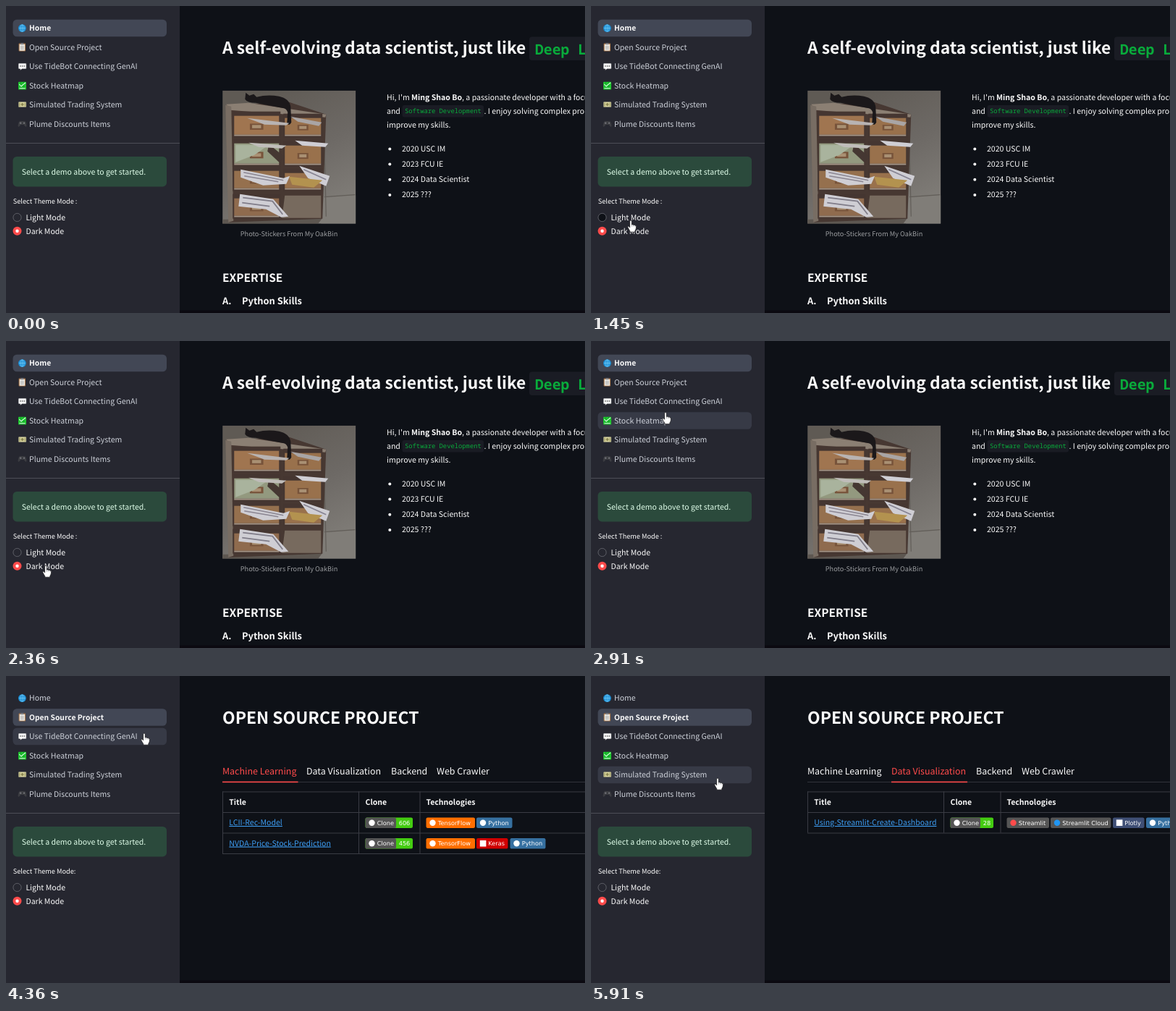
An HTML page that plays this animation: 800x424 px, repeating every 6 s.

```html
<!DOCTYPE html>
<html lang="en">
<head>
<meta charset="utf-8">
<title>Portfolio demo</title>
<style>
  html, body { margin: 0; width: 100%; height: 100%; overflow: hidden; background: #0e1117; }
  svg { display: block; }
  text { white-space: pre; text-rendering: geometricPrecision;
    font-family: 'Noto Sans CJK SC', 'Noto Sans CJK JP', 'Noto Sans CJK TC', 'Noto Sans', sans-serif; }
  .mono { font-family: 'Noto Sans Mono', 'DejaVu Sans Mono', monospace; }
  .badge { font-family: 'DejaVu Sans', sans-serif; }
</style>
</head>
<body>
<svg id="stage" width="800" height="424" viewBox="0 0 800 424"></svg>
<script>
const LOOP = 6000, FPS = 11;
const RED = '#ff4b4b', GREEN = '#09ab3b';

const THEMES = {
  dark: {
    main: '#0e1117', side: '#262730', text: '#fafafa', nav: '#ccd0d8', active: '#424755', hover: '#373a46',
    line: '#4d4e56', alert: '#2b4a3c', alertText: '#dffde9', caption: '#9a9c9f', chip: '#1a1c24',
    radio: '#262730', radioHover: '#0e1117', ring: '#6b6c74', ink: '#30323a', pad: '#3c3d42', board: '#a8794e'
  },
  light: {
    main: '#ffffff', side: '#f0f2f6', text: '#31333f', nav: '#5b5f6a', active: '#dadfe9', hover: '#e3e7ee',
    line: '#d2d4da', alert: '#dbede6', alertText: '#21703f', caption: '#85878d', chip: '#f8f9fb',
    radio: '#ffffff', radioHover: '#ffffff', ring: '#b4b6bd', ink: '#22242a', pad: '#202226', board: '#22242a'
  }
};

const NAV = ['Home', 'Open Source Project', 'Use TideBot Connecting GenAI',
  'Stock Heatmap', 'Simulated Trading System', 'Plume Discounts Items'];
const TABS = [['Machine Learning', 299, 403.5], ['Data Visualization', 415, 520], ['Backend', 532, 583], ['Web Crawler', 595, 670]];

// Pointer path: step, x, y of the tip
const PATH = [
  [4, 560, 397], [5, 500, 335], [6, 410, 280], [7, 300, 268], [8, 190, 276], [9, 110, 288], [10, 66, 298],
  [11, 62, 312], [13, 60, 318], [16, 55, 296], [18, 55, 296], [21, 55, 310], [26, 55, 310], [28, 60, 280],
  [30, 84, 185], [32, 103, 98.5], [33, 107, 78], [34, 108, 67], [47, 108, 67], [48, 191, 79], [50, 345, 108],
  [52, 442, 128], [54, 470, 132], [60, 470, 132], [61, 425, 135], [62, 355, 141], [63, 278, 146],
  [64, 203, 150], [65, 175, 141]
];

const text = (x, y, s, fill, size = 10.55, weight = 400, attrs = '') =>
  `<text x="${x}" y="${y}" fill="${fill}" font-size="${size}" font-weight="${weight}" ${attrs}>${s}</text>`;
const rect = (x, y, w, h, fill, r = 0) =>
  `<rect x="${x}" y="${y}" width="${w}" height="${h}" rx="${r}" fill="${fill}"/>`;
const circle = (x, y, r, fill, attrs = '') => `<circle cx="${x}" cy="${y}" r="${r}" fill="${fill}" ${attrs}/>`;
const path = (d, fill, stroke = 'none', width = 1) =>
  `<path d="${d}" fill="${fill}" stroke="${stroke}" stroke-width="${width}"/>`;

function pointer(step) {
  const i = PATH.findIndex(p => p[0] >= step);
  if (step < PATH[0][0] || i < 0) return null;
  const b = PATH[i], a = PATH[Math.max(0, i - 1)];
  const u = b[0] === a[0] ? 1 : (step - a[0]) / (b[0] - a[0]);
  return { x: a[1] + (b[1] - a[1]) * u, y: a[2] + (b[2] - a[2]) * u };
}

const within = (p, x0, y0, x1, y1) => !!p && p.x >= x0 && p.x <= x1 && p.y >= y0 && p.y <= y1;
const navTop = i => 18.7 + 26.5 * i;
const overNav = (p, i) => within(p, 9.5, navTop(i), 222, navTop(i) + 23.6);
const overTab = (p, i) => within(p, TABS[i][1], 118, TABS[i][2], 147);

function icons(c) {
  return circle(22.4, 30.6, 5.4, '#1c8fd6') +
    path('M18 30.6h8.8M22.4 26v9.2', 'none', '#7fd0f7', 0.7) +
    `<ellipse cx="22.4" cy="30.6" rx="2.5" ry="4.8" fill="none" stroke="#7fd0f7" stroke-width=".7"/>` +
    rect(17.6, 51.6, 9.4, 11, c.board, 1) +
    rect(18.7, 53, 7.2, 8.6, '#f1efe9') + rect(20.2, 50.9, 4.2, 2.4, '#77797f', 0.6) +
    path('M19.8 55.6h5M19.8 57.5h5M19.8 59.4h5', 'none', '#85878c', 0.7) +
    path('M18 79h9.2q1 0 1 1v6q0 1-1 1h-5l-2.6 2v-2H18q-1 0-1-1v-6q0-1 1-1z', '#f8f8f8', c.ink, 0.7) +
    [20, 22.6, 25.2].map(x => circle(x, 83, 0.8, '#333')).join('') +
    rect(17, 104.7, 11, 10.8, '#1fc42f', 0.8) +
    path('M20.4 105v10M24.2 105v10', 'none', '#0c7a27', 0.5) +
    path('M18.4 108l2.6 3 2-1.8 4-3.4M18.5 113.7h8', 'none', '#e9fff0', 1.1) +
    rect(16.8, 132, 11.6, 8.2, c.ink, 0.6) + rect(17.4, 132.6, 10.4, 7, '#dcd7a1', 0.4) +
    circle(22.6, 136.1, 2, '#8d8a55') + path('M19 133.5v5M26.2 133.5v5', 'none', '#77743f', 0.8) +
    path('M19.5 159h6q1.7 0 2.3 3l.7 3.7q-.6 2-2.2.4l-1.6-2h-4.4l-1.6 2q-1.6 1.6-2.2-.4l.7-3.7q.6-3 2.3-3z', c.pad) +
    path('M18.8 161.7h2.6M20.1 160.4v2.6', 'none', '#8b8c91', 0.7) + circle(25, 161.7, 0.9, '#8b8c91');
}

function sidebar(c, s) {
  let out = rect(0, 0, 240, 424, c.side);
  NAV.forEach((label, i) => {
    const y = navTop(i), active = i === s.page, hot = overNav(s.tip, i);
    if (active || hot) out += rect(9.5, y, 212.5, 23.6, hot ? c.hover : c.active, 5.5);
    out += text(32, y + 15.7, label, active ? c.text : c.nav, active ? 10.3 : 10.55, active ? 700 : 400);
  });
  out += icons(c);
  if (s.blank) return out;
  out += rect(0, 189, 240, 1, c.line) + rect(9.5, 208, 212.5, 41.4, c.alert, 5.5);
  out += text(21.8, 232.8, 'Select a demo above to get started.', c.alertText, 10.5);
  out += text(9.8, 273.3, s.page ? 'Select Theme Mode:' : 'Select Theme Mode :', c.text, 9.2);
  ['Light Mode', 'Dark Mode'].forEach((label, i) => {
    const y = 292 + 18.7 * i, checked = (i === 0) === s.light;
    const hot = within(s.tip, 9, y - 9, 84, y + 9.6);
    out += checked
      ? circle(15.5, y, 6, RED) + circle(15.5, y, 2.2, '#fff')
      : circle(15.5, y, 5.6, hot ? c.radioHover : c.radio, `stroke="${c.ring}" stroke-width=".8"`);
    out += text(27.4, y + 4.2, label, c.text);
  });
  return out;
}

function drawer(x, y, w, h, fill) {
  return rect(x - 2, y - 3, w + 4, h + 6, '#453631') + rect(x, y + 3, w, h - 4, fill) +
    rect(x + w * 0.35, y + h * 0.46, w * 0.3, h * 0.28, '#77533a') +
    rect(x + w * 0.4, y + h * 0.52, w * 0.2, h * 0.15, '#a99073') +
    path(`M${x} ${y + h}h${w}`, 'none', '#a39486', 1.8);
}

function photo() {
  const paper = (d, fill = '#cfced4') => path(d, fill);
  let out = rect(0, 0, 184, 184, 'url(#wall)');
  out += path('M140 148L184 145V184H136z', '#807d78') + path('M0 178L138 176 132 184H0z', '#5d5751');
  out += path('M140 40l3 134M141 147l42-3', 'none', '#615d58', 1.2);
  out += path('M5 20L92 16 143 33 138 177 9 182z', '#473832') + path('M5 19L36 17 143 33 142 37 10 27z', '#8b7f73');
  out += path('M4 20l8 2 3 158-7 2z', '#786d63');
  const fills = ['#a07550', '#93997f', '#95704e', '#8f6b4e'];
  [[32, 30], [70, 32], [108, 28], [146, 28]].forEach(([y, h], r) => {
    out += drawer(16, y, 62, h, fills[r]);
    if (r < 3) out += drawer(86, y + 3, 50, h - 3, '#99714c');
  });
  out += path('M86 145H136V176H82z', '#776a5e');
  out += path('M18 75h46l-20 14-26 10z', '#a9b39d') + path('M64 74l22 18-8 7-16-15z', '#453732');
  out += path('M31 12L32 3 37 7 43 5 47 9Q62 5 78 8 92 11 94 22L95 44Q92 50 89 45L90 30Q88 24 82 24 60 20 46 17 34 17 31 12z', '#1b181a');
  out += paper('M34 38L92 45 88 48 58 47z', '#b8b3b2') + paper('M94 36L137 44 133 49 104 43z', '#a9a5a5');
  out += paper('M36 72L88 76 82 80 50 78z', '#c0bdba') + paper('M100 69L146 73 142 78 110 76z');
  out += paper('M25 109L84 121 93 118 88 129 56 131 25 120z') + path('M29 113l55 11M30 118l47 8', 'none', '#8b8692', 1.5);
  out += paper('M106 104L148 118 143 132 118 121z') + path('M112 109l31 14', 'none', '#868392', 1.8);
  out += paper('M92 119l46 5-12 10-30-4z', '#b3924f');
  out += paper('M24 143L70 150 91 174 81 175 60 164 22 160z') + path('M28 148l41 5 14 18M27 155l38 5', 'none', '#807d89', 1.8);
  return `<svg x="299" y="116.7" width="184.5" height="184" viewBox="0 0 184 184"><g filter="url(#soft)">${out}</g></svg>`;
}

function homePage(c) {
  const body = (x, y, s) => text(x, y, s, c.text);
  let out = text(299, 66, 'A self-evolving data scientist, just like', c.text, 22.8, 700);
  out += rect(723, 42.5, 90, 32.5, c.chip, 4) + text(731, 66.6, 'Deep Learning', GREEN, 19.8, 600, 'class="mono"');
  out += photo() + text(391, 318.3, 'Photo-Stickers From My OakBin', c.caption, 9.2, 400, 'text-anchor="middle"');
  out += body(526, 130.2, `Hi, I'm <tspan font-weight="700">Ming Shao Bo</tspan>, a passionate developer with a focus on`);
  out += body(526, 149, 'and') + rect(547.5, 137, 112.5, 16.4, c.chip, 3);
  out += text(551, 148.4, 'Software Development', GREEN, 8.82, 400, 'class="mono"');
  out += body(660.5, 149, '. I enjoy solving complex problems') + body(526, 167.7, 'improve my skills.');
  ['2020 USC IM', '2023 FCU IE', '2024 Data Scientist', '2025 ???'].forEach((s, i) => {
    const y = 200.8 + 21.2 * i;
    out += circle(530.3, y - 3.4, 2, c.text) + body(547, y, s);
  });
  return out + text(299, 381, 'EXPERTISE', c.text, 15.5, 700) +
    text(299, 411.6, 'A.', c.text, 12.85, 700) + text(326, 411.6, 'Python Skills', c.text, 12.85, 700);
}

function badge(x, y, w, label, fill, mark = 'round', tint = '#fff') {
  const icon = mark === 'round' ? circle(x + 9, y + 7.3, 4.2, tint) : rect(x + 4.8, y + 3, 8.6, 8.6, tint);
  return rect(x, y, w, 14.6, fill, 2.2) + icon + text(x + 16.3, y + 10.4, label, '#fff', 8.2, 400, 'class="badge"');
}

function cloneBadge(y, count, w, split) {
  return rect(496.5, y, w, 14.6, '#4c1', 2.2) + badge(496.5, y, split, 'Clone', '#555') +
    text(496.5 + (split + w) / 2, y + 10.4, count, '#fff', 8.2, 400, 'class="badge" text-anchor="middle"');
}

function projectPage(c, s) {
  const grid = '#3a3c44', col = s.tab ? 565.5 : 571.5, bottom = s.tab ? 216.5 : 245;
  let out = text(299, 66, 'OPEN SOURCE PROJECT', c.text, 22.9, 700);
  TABS.forEach(([label, x], i) => {
    out += text(x, 136.2, label, i === s.tab || overTab(s.tip, i) ? RED : c.text, 12.45);
  });
  const mix = i => TABS[0][i] + (TABS[1][i] - TABS[0][i]) * s.slide;
  out += rect(299, 146, 501, 1, '#31333b') + rect(mix(1), 145.6, mix(2) - mix(1), 1.6, RED);

  const rows = s.tab ? [159.5, 188, bottom] : [159.5, 188, 216.5, bottom];
  rows.forEach(y => out += rect(299, y, 501, 1, grid));
  [299, 487, col].forEach(x => out += rect(x, 159.5, 1, bottom - 159.5, grid));
  [['Title', 308.3], ['Clone', 496.5], ['Technologies', col + 9]].forEach(([h, x]) => out += text(x, 177.7, h, c.text, 10.5, 700));
  const link = (y, s) => text(308.3, y, s, '#3d9df3', 10.55, 400, 'text-decoration="underline"');
  const x = col + 9, y = 195.4;
  if (s.tab) {
    return out + link(206, 'Using-Streamlit-Create-Dashboard') + cloneBadge(y, '28', 59.5, 41.5) +
      badge(x, y, 58.5, 'Streamlit', '#555', 'round', RED) +
      badge(x + 60.5, y, 83.5, 'Streamlit Cloud', '#555', 'round', '#2196f3') +
      badge(x + 146.5, y, 43.5, 'Plotly', '#3f4f75', 'square') + badge(x + 192.5, y, 49, 'Python', '#3670a0');
  }
  const y2 = y + 28.6;
  return out + link(206, 'LCII-Rec-Model') + link(234.6, 'NVDA-Price-Stock-Prediction') +
    cloneBadge(y, '606', 65.5, 42.5) + badge(x, y, 67.5, 'TensorFlow', '#ff6f00') + badge(x + 69.5, y, 49.5, 'Python', '#3670a0') +
    cloneBadge(y2, '456', 65.5, 42.5) + badge(x, y2, 67.5, 'TensorFlow', '#ff6f00') +
    badge(x + 69.5, y2, 43.5, 'Keras', '#d00000', 'square') + badge(x + 116, y2, 49, 'Python', '#3670a0');
}

function cursor(s) {
  if (!s.tip) return '';
  const { x, y } = s.tip;
  const onNav = NAV.some((_, i) => overNav(s.tip, i));
  const onRadio = !s.blank && within(s.tip, 9, 283, 84, 321);
  const onTab = s.page === 1 && TABS.some((_, i) => overTab(s.tip, i));
  const shape = onNav || onRadio || onTab
    ? path('M-1.4 .8Q0-.8 1.3.8V6q2-.8 2.5.5 1.7-.6 2.2.7 1.6-.3 1.6 1.3 0 4-1.8 6.2v1.5H-1.2v-1.4Q-3.2 12-4.2 9.5-4.4 7.6-2.8 8.2L-1.4 9.8z', '#fff', '#1b1b1f', 0.8) +
      path('M1.4 6.2v2.4M3.8 6.7v2M6 7.4v1.6', 'none', '#55565c', 0.5)
    : path('M0 0V12.6L2.9 9.9 5 14.6 7 13.7 5 9.2H9z', '#fff', '#1b1b1f', 0.8);
  return `<g transform="translate(${x.toFixed(2)} ${y.toFixed(2)})">${shape}</g>`;
}

const DEFS = `<defs>
  <linearGradient id="wall" x1="0.3" x2="0.8" y1="0" y2="1">
    <stop stop-color="#5f5a54"/><stop offset=".5" stop-color="#6d6965"/><stop offset="1" stop-color="#83807b"/>
  </linearGradient>
  <filter id="soft" x="0" y="0" width="1" height="1"><feGaussianBlur stdDeviation=".7" edgeMode="duplicate"/></filter>
</defs>`;

function draw(step) {
  const s = {
    tip: pointer(step),
    light: step >= 18 && step < 26,
    page: step >= 40 ? 1 : 0,
    blank: step === 40 || step === 41,
    tab: step >= 58 ? 1 : 0,
    slide: Math.min(1, Math.max(0, (step - 57) / 3))
  };
  const c = THEMES[s.light ? 'light' : 'dark'];
  let out = DEFS + rect(0, 0, 800, 424, c.main);
  if (!s.blank) out += s.page ? projectPage(c, s) : homePage(c);
  if (!s.light) out += rect(240, 420.5, 560, 3.5, '#0b0910');
  out += sidebar(c, s);
  document.getElementById('stage').innerHTML = out + cursor(s);
}

const start = performance.now();
let shown = -1;
function tick() {
  const t = (performance.now() - start) % LOOP;
  const step = Math.min(65, Math.floor(t * FPS / 1000 + 0.07));
  if (step !== shown) draw(shown = step);
  requestAnimationFrame(tick);
}
tick();
</script>
</body>
</html>
```
